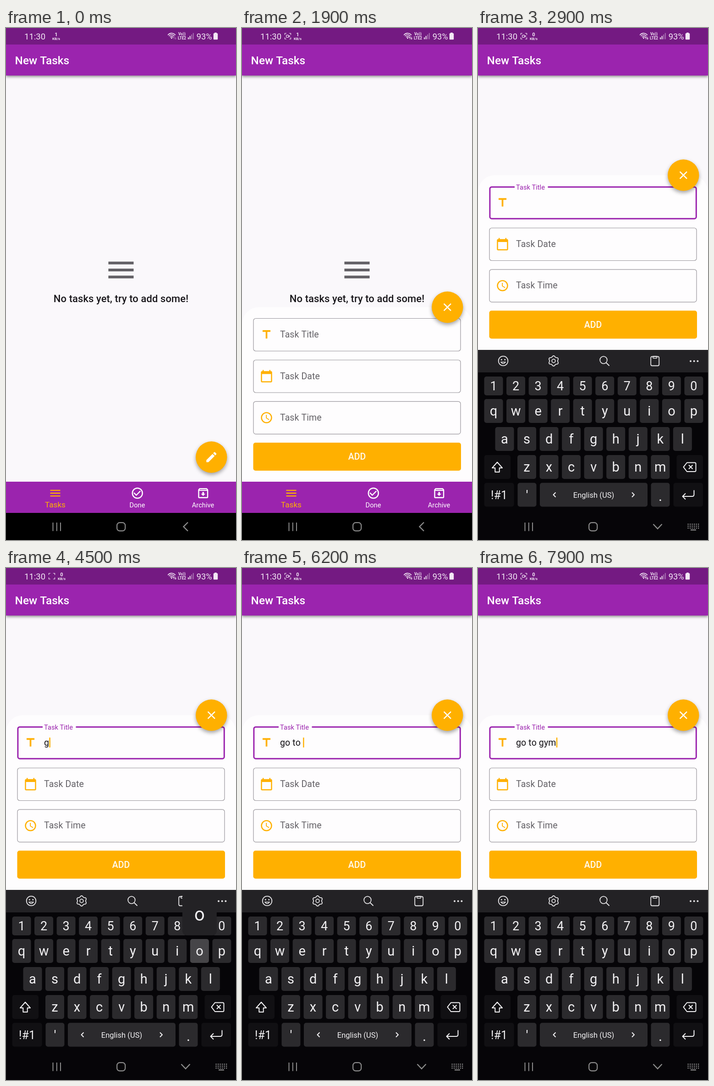
An HTML page with a canvas that plays this animation: 502 px wide and 1115 px high, repeating every 8 s.

```html
<!DOCTYPE html>
<html lang="en">
<head>
<meta charset="utf-8">
<title>Task list</title>
<style>
  html, body { margin: 0; width: 100%; height: 100%; overflow: hidden; background: #000; }
  canvas { display: block; width: 502px; height: 1115px; }
</style>
</head>
<body>
<canvas id="stage"></canvas>
<script>
const W = 502, H = 1115, LOOP = 8000, STEP = 100, DP = 1.2214;
const PURPLE = '#9b24ae', AMBER = '#ffb000', PALE = '#f3e8f5', GREY = '#8b8b8b';
const SHEET_H = 380, NAV_TOP = 988, KB_TOP = 701;
const FOCUS = 2400, RESIZE = 2700, HOLD = 100;

const KEY_PRESSES = [
  [4100, 'g'], [4500, 'o'], [4900, ' '], [5200, 't'], [5500, 'o'],
  [6000, ' '], [6400, 'g'], [6900, 'y'], [7400, 'm']
];

const ROWS = [
  { keys: '1234567890', x: 34, y: 779.5, h: 41, size: 27 },
  { keys: 'qwertyuiop', x: 34, y: 834, h: 52, size: 29 },
  { keys: 'asdfghjkl', x: 58, y: 895, h: 52, size: 29 },
  { keys: 'zxcvbnm', x: 106.5, y: 956, h: 52, size: 29 }
];

const RING = 'M12 2a10 10 0 1 0 0 20a10 10 0 1 0 0-20zM12 4a8 8 0 1 1 0 16a8 8 0 1 1 0-16z';
const ICONS = {
  menu: 'M3 18h18v-2H3zM3 13h18v-2H3zM3 6v2h18V6z',
  title: 'M5 4v3h5.5v12h3V7H19V4z',
  date: 'M20 3h-1V1h-2v2H7V1H5v2H4c-1.1 0-2 .9-2 2v16c0 1.1.9 2 2 2h16c1.1 0 2-.9 2-2V5c0-1.1-.9-2-2-2zM20 21H4V8h16z',
  time: RING + 'M12.5 7H11v6l5.25 3.15.75-1.23-4.5-2.67z',
  done: RING + 'M16.59 7.58L10 14.17l-3.59-3.58L5 12l5 5 8-8z',
  archive: 'M20.54 5.23l-1.39-1.68C18.88 3.21 18.47 3 18 3H6c-.47 0-.88.21-1.16.55L3.46 5.23C3.17 5.57 3 6.02 3 6.5V19c0 1.1.9 2 2 2h14c1.1 0 2-.9 2-2V6.5c0-.48-.17-.93-.46-1.27zM6.24 5h11.52l.83 1H5.42zM5 19V8h14v11zM13.45 10h-2.9v3H8l4 4 4-4h-2.55z',
  edit: 'M3 17.25V21h3.75L17.81 9.94l-3.75-3.75zM20.71 7.04c.39-.39.39-1.02 0-1.41l-2.34-2.34c-.39-.39-1.02-.39-1.41 0l-1.83 1.83 3.75 3.75z',
  close: 'M19 6.41L17.59 5 12 10.59 6.41 5 5 6.41 10.59 12 5 17.59 6.41 19 12 13.41 17.59 19 19 17.59 13.41 12z'
};
for (const name in ICONS) ICONS[name] = new Path2D(ICONS[name]);

const canvas = document.getElementById('stage');
const ctx = canvas.getContext('2d');
const ratio = window.devicePixelRatio || 1;
canvas.width = W * ratio;
canvas.height = H * ratio;

const clamp = v => Math.max(0, Math.min(1, v));
const smooth = p => p * p * (3 - 2 * p);

function rect(x, y, w, h, color) {
  ctx.fillStyle = color;
  ctx.fillRect(x, y, w, h);
}

function box(x, y, w, h, r, color) {
  ctx.beginPath();
  ctx.roundRect(x, y, w, h, r);
  ctx.fillStyle = color;
  ctx.fill();
}

function outline(x, y, w, h, r, color, width) {
  ctx.beginPath();
  ctx.roundRect(x, y, w, h, r);
  ctx.strokeStyle = color;
  ctx.lineWidth = width;
  ctx.stroke();
}

function dot(x, y, r, color) {
  ctx.beginPath();
  ctx.arc(x, y, r, 0, 7);
  ctx.fillStyle = color;
  ctx.fill();
}

function stroke(d, color, width) {
  ctx.strokeStyle = color;
  ctx.lineWidth = width;
  ctx.stroke(new Path2D(d));
}

// y is the middle of the capital letters
function text(str, x, y, size, color, { weight = 400, align = 'left', spacing = 0 } = {}) {
  ctx.font = `${weight} ${size}px Roboto, sans-serif`;
  ctx.letterSpacing = spacing + 'px';
  ctx.textAlign = align;
  ctx.fillStyle = color;
  ctx.fillText(str, x, y + size * 0.355);
}

function icon(name, x, y, color, scale = DP) {
  ctx.save();
  ctx.translate(x, y);
  ctx.scale(scale, scale);
  ctx.translate(-12, -12);
  ctx.fillStyle = color;
  ctx.fill(ICONS[name], 'evenodd');
  ctx.restore();
}

function withShadow(blur, dy, alpha, draw) {
  ctx.save();
  ctx.shadowColor = `rgba(0,0,0,${alpha})`;
  ctx.shadowBlur = blur * ratio;
  ctx.shadowOffsetY = dy * ratio;
  draw();
  ctx.restore();
}

function statusBar(t) {
  const recording = t >= 100;
  rect(0, 0, W, 36, '#741a82');
  text('11:30', 40, 18, 18.5, PALE);

  if (recording) {
    stroke('M93.5 15v-3.5h3.5M103 11.5h3.5V15M106.500 20.500V24h-3.500M97 24h-3.500v-3.500', PALE, 1.2);
    if (Math.floor((t + 100) / 500) % 2 === 0) {
      outline(96.6, 15.4, 4.8, 5, 1, PALE, 1.2);
      stroke('M102 17.500l2-1.500v4l-2-1.500', PALE, 1);
    }
  }
  const rateX = recording ? 121.5 : 109.5;
  const bold = { weight: 700, align: 'center' };
  text(t < 2100 ? '1' : '0', rateX, 13.8, 11, PALE, bold);
  text('KB/s', rateX, 23.2, 7.8, PALE, bold);

  ctx.lineCap = 'round';
  for (const r of [3.6, 7.2, 10.6]) {
    ctx.beginPath();
    ctx.arc(361.5, 22, r, -Math.PI * 0.77, -Math.PI * 0.23);
    ctx.strokeStyle = PALE;
    ctx.lineWidth = 1.6;
    ctx.stroke();
  }
  ctx.lineCap = 'butt';
  dot(361.5, 21.8, 1.6, PALE);
  const arrows = recording ? PALE : '#a76cb0';
  stroke('M366.500 24.500v-5M365 21l1.500-1.700l1.500 1.700M370 19v5M368.500 22.700l1.500 1.700l1.500-1.700', arrows, 1.1);

  text('Vo))', 384, 13.3, 8.5, PALE, bold);
  text('LTE2', 384, 22, 8.3, PALE, bold);
  for (let i = 0; i < 4; i++) {
    const h = 4 + i * 3.2;
    rect(397 + i * 3.6, 24.5 - h, 2, h, i < 2 ? PALE : '#a873b1');
  }
  text('93%', 415.7, 18, 18.4, PALE);
  rect(455.2, 10, 4.6, 2, PALE);
  box(452.8, 11.4, 9.4, 13.8, 1.2, PALE);
}

function appBar() {
  withShadow(6, 2, 0.45, () => rect(0, 36, W, 67.5, PURPLE));
  text('New Tasks', 19.6, 70, 24.4, '#fff', { weight: 500 });
}

function emptyMessage() {
  icon('menu', 251, 527, '#636166', 3.06);
  text('No tasks yet, try to add some!', 251, 589, 22, '#19171b',
    { weight: 500, align: 'center', spacing: 0.08 });
}

function field(y, name, label) {
  outline(25, y, 452, 71, 5, '#98959b', 1.2);
  icon(name, 53.5, y + 35.3, AMBER);
  text(label, 83, y + 34.6, 19.54, '#646267', { spacing: 0.08 });
}

function titleField(t, y) {
  if (t < FOCUS) return field(y, 'title', 'Task Title');
  const p = smooth(clamp((t - FOCUS) / 230));
  outline(25.9, y + 1.2, 450.4, 69, 4, PURPLE, 3);
  if (p > 0) rect(80, y - 1, 72.5 * p, 4.5, '#fefdfe');
  icon('title', 53.5, y + 35.3, AMBER);
  text('Task Title', 83, y + 34.6 - 33 * p, 19.54 * (1 - 0.25 * p), PURPLE);

  let typed = '', edited = FOCUS;
  for (const [at, ch] of KEY_PRESSES) {
    if (t < at + HOLD) break;
    typed += ch;
    edited = at + HOLD;
  }
  text(typed, 83, y + 34.8, 19.54, '#141216', { spacing: 0.12 });
  if ((t - edited) % 1000 < 500) {
    rect(83.3 + ctx.measureText(typed).width, y + 24.3, 2.4, 21.5, AMBER);
  }
}

function sheet(t, top) {
  box(0, top, W, SHEET_H + 2, [37, 37, 0, 0], '#fefdfe');
  titleField(t, top + 24.5);
  field(top + 115, 'date', 'Task Date');
  field(top + 205.3, 'time', 'Task Time');
  box(24.5, top + 295, 453.5, 61, 5, AMBER);
  text('ADD', 251, top + 325.3, 19.5, '#fffaf0', { weight: 500, align: 'center' });
}

function fab(y, open) {
  withShadow(8, 4, 0.36, () => dot(448.3, y, 34.2, AMBER));
  icon(open ? 'close' : 'edit', 448.3, y, '#fff');
}

function tabs() {
  const mid = { align: 'center' };
  rect(0, NAV_TOP, W, 68, PURPLE);
  icon('menu', 107.5, 1013, AMBER);
  text('Tasks', 107.5, 1037.5, 17.1, AMBER, mid);
  icon('done', 286.8, 1013, '#fff');
  text('Done', 286.5, 1038.5, 14.65, '#fff', mid);
  icon('archive', 430.3, 1013, '#fff');
  text('Archive', 430, 1038.5, 14.65, '#fff', mid);
}

function systemNav(typing, alpha) {
  ctx.save();
  ctx.globalAlpha = alpha;
  for (const x of [102.5, 110.8, 119]) rect(x - 1, 1077, 2, 18.5, GREY);
  outline(242.2, 1077.2, 18, 18, 6, GREY, 2.2);
  if (typing) {
    stroke('M382.500 1080.500l9.500 10l9.500-10', GREY, 2.4);
    for (let i = 0; i < 18; i++) {
      rect(457.5 + (i % 6) * 4.5, 1079.5 + Math.floor(i / 6) * 4.2, 2.3, 2.3, GREY);
    }
    rect(464, 1092, 12, 2.2, GREY);
  } else {
    stroke('M397 1076.500l-9.500 9.500l9.500 9.500', GREY, 2.4);
  }
  ctx.restore();
}

function toolbar() {
  const c = '#e4e3e5';
  rect(0, KB_TOP, W, 49, '#232225');
  ctx.lineCap = ctx.lineJoin = 'round';
  outline(44.7, 714.7, 20.6, 20.6, 10.3, c, 1.8);
  dot(51.3, 722.3, 1.5, c);
  dot(58.7, 722.3, 1.5, c);
  stroke('M49.800 727.500q5.200 6.500 10.400 0z', c, 1.6);

  ctx.beginPath();
  for (let i = 0; i <= 72; i++) {
    const a = i * Math.PI / 36, r = 10 + 1.2 * Math.cos(6 * a);
    ctx.lineTo(165 + r * Math.sin(a), 725 - r * Math.cos(a));
  }
  ctx.strokeStyle = c;
  ctx.lineWidth = 1.8;
  ctx.stroke();
  outline(161.2, 721.2, 7.6, 7.6, 3.8, c, 1.8);

  outline(266.2, 715.2, 15.6, 15.6, 7.8, c, 1.8);
  stroke('M279.800 729l6.200 6', c, 2);
  outline(377.2, 715.5, 18, 20, 3, c, 1.8);
  outline(382, 714.7, 8.4, 4.6, 1, c, 1.6);
  for (const x of [464, 471.7, 479.4]) dot(x, 725.5, 2, c);
  ctx.lineCap = 'butt';
  ctx.lineJoin = 'miter';
}

function keyCaps(pressed) {
  const white = '#f2f1f3', key = '#2b2a2d', dark = '#111013', lit = '#464548';
  const mid = { align: 'center' };
  let popup = null;
  for (const row of ROWS) {
    [...row.keys].forEach((ch, i) => {
      const x = row.x + i * 48.55;
      box(x - 20.5, row.y - row.h / 2, 41, row.h, 5, ch === pressed ? lit : key);
      text(ch, x, row.y, row.size, white, mid);
      if (ch === pressed) popup = { x, y: row.y };
    });
  }
  for (const [x, y, w] of [[13.5, 930, 57.5], [433.5, 930, 57.5], [13.5, 990.5, 65], [426.5, 990.5, 64.5]]) {
    box(x, y, w, 52, 5, dark);
  }
  box(86.5, 990.5, 41, 52, 5, key);
  box(135, 990.5, 235, 52, 5, pressed === ' ' ? lit : key);
  box(377.5, 990.5, 41, 52, 5, key);
  text('!#1', 46, 1017, 25, white, mid);
  text("'", 107, 1018, 29, white, mid);
  text('.', 398, 1019, 31, white, mid);
  text('English (US)', 252.5, 1017, 16.5, white, mid);

  ctx.lineJoin = 'round';
  stroke('M169.500 1011.500l-5 5l5 5M336 1011.500l5 5l-5 5', white, 2);
  stroke('M42 945.500l11 12.500h-6.300v9h-9.400v-9H31z', white, 2);
  stroke('M456 946.500h17q2.500 0 2.500 2.500v14.500q0 2.500-2.500 2.500h-17l-7.500-9.800zM460 951.800l8.500 8.500M468.500 951.800l-8.500 8.500', white, 2);
  stroke('M471.500 1006.500v9.500q0 4-4 4H447M453 1013.500l-6.500 6.500l6.500 6.500', white, 2);
  ctx.lineJoin = 'miter';

  if (popup) {
    box(popup.x - 37.5, popup.y - 126, 75, 92, 9, '#232225');
    text(popup.x && pressed, popup.x, popup.y - 80, 40, white, mid);
  }
}

function keyboard(t) {
  const rise = clamp((t - FOCUS) / 400);
  const drop = (H - KB_TOP) * Math.pow(1 - rise, 1.64);
  const press = KEY_PRESSES.find(([at]) => t >= at && t < at + HOLD);
  ctx.save();
  ctx.translate(0, drop);
  rect(0, KB_TOP, W, H - KB_TOP, '#060508');
  toolbar();
  keyCaps(press && press[1]);
  ctx.restore();
  systemNav(true, rise < 1 ? 0.6 : 1);
}

function draw(t) {
  ctx.setTransform(ratio, 0, 0, ratio, 0, 0);
  rect(0, 0, W, H, '#faf8fb');
  emptyMessage();

  const p = clamp((t - 1050) / 300);
  const open = p > 0;
  const lift = t >= RESIZE ? NAV_TOP - KB_TOP + 0.5 : 0;
  const top = NAV_TOP - SHEET_H * (1 - (1 - p) ** 2) - lift;
  if (open) sheet(t, top);
  appBar();
  statusBar(t);
  fab(Math.min(934.5, top), open);
  tabs();
  rect(0, 1056, W, 59, '#000');
  if (t > FOCUS) keyboard(t);
  else systemNav(false, 1);
}

function tick() {
  const t = performance.now() % LOOP;
  draw(Math.floor(t / STEP) * STEP);
  requestAnimationFrame(tick);
}
tick();
</script>
</body>
</html>
```
